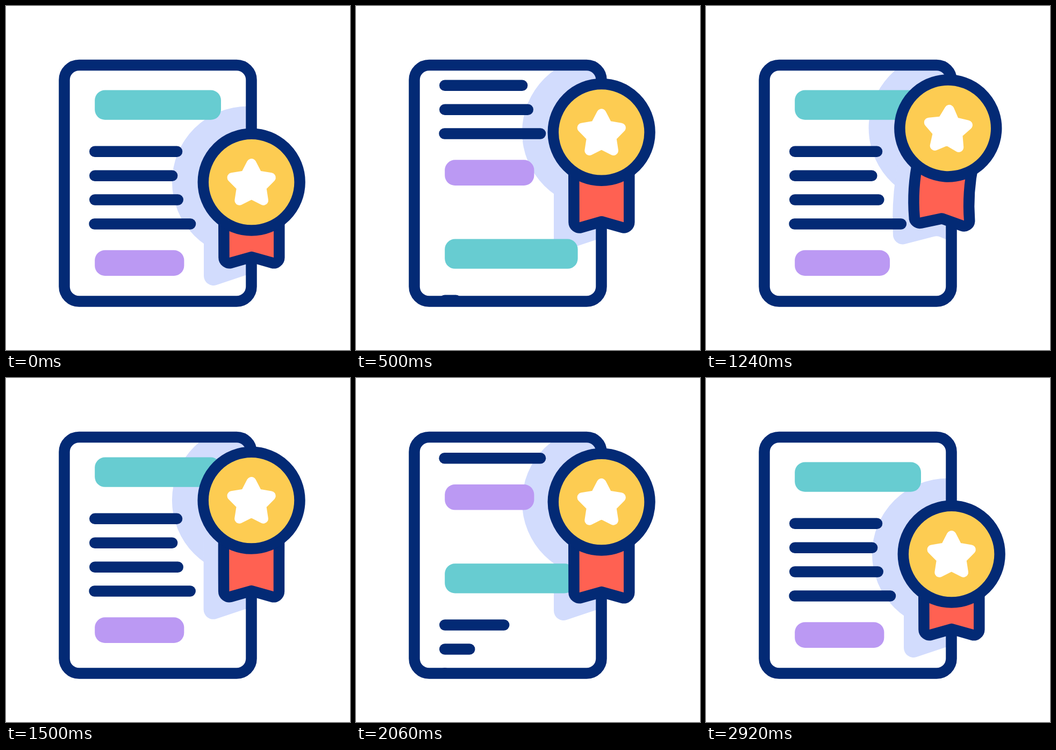
An HTML page that plays this animation: 640 by 640 pixels, repeating every 3020 ms.

```html
<!DOCTYPE html>
<html lang="en">
<head>
<meta charset="utf-8">
<title>Certificate</title>
<style>
  html, body { margin: 0; width: 100%; height: 100%; overflow: hidden; background: #fff; }
  svg { display: block; width: 100%; height: 100%; }
</style>
</head>
<body>
<svg viewBox="0 0 640 640">
  <clipPath id="page"><rect x="108.5" y="110" width="348" height="439.5" rx="27.5"/></clipPath>
  <g clip-path="url(#page)">
    <g class="swing" fill="#d2dcfd">
      <circle cx="450" cy="327.5" r="141"/>
      <path id="shadowTail"/>
    </g>
    <g class="copy"></g>
    <g class="copy"></g>
  </g>
  <g fill="none" stroke="#032a75" stroke-width="20.5">
    <rect x="108.5" y="110" width="348" height="439.5" rx="27.5"/>
    <g class="swing">
      <path id="tail" fill="#ff6152" stroke-linejoin="round"/>
      <circle cx="456.7" cy="327.7" r="89.9" fill="#fdcc52"/>
      <path id="star" fill="#fff" stroke="#fff" stroke-width="18" stroke-linejoin="round"/>
    </g>
  </g>
</svg>
<script>
const LOOP = 3020, SECOND = 1400, PERIOD = 445;
const NAVY = '#032a75';
const $ = id => document.getElementById(id);
const all = selector => [...document.querySelectorAll(selector)];

const line = (x, y, w, start) =>
  ({ x, y: y - 10.25, w, h: 20.5, r: 10.25, color: NAVY, start, min: 20.5, extra: 24 });
const block = (y, w, h, color, start) =>
  ({ x: 165.2, y, w, h, r: 19, color, start, min: 0, extra: w * 0.085 });

const items = [
  block(156.5, 234.8, 55.3, '#67ccd1', 112),
  line(155, 270.8, 173.3, 409),
  line(155, 315.7, 164.4, 512),
  line(155, 360.6, 175, 653),
  line(154.3, 405.5, 199, 756),
  block(454.3, 166.2, 47.6, '#bb99f3', 745)
];

const copies = all('.copy').map(group => ({
  group,
  bars: items.map(item => {
    const bar = document.createElementNS('http://www.w3.org/2000/svg', 'rect');
    const attrs = { x: item.x, y: item.y, height: item.h, rx: item.r, ry: item.r, fill: item.color };
    for (const name in attrs) bar.setAttribute(name, attrs[name]);
    return group.appendChild(bar);
  })
}));

// Eased value between [time, value] keys
function tween(t, keys) {
  if (t <= keys[0][0]) return keys[0][1];
  for (let i = 1; i < keys.length; i++) {
    const [t0, a] = keys[i - 1], [t1, b] = keys[i];
    if (t < t1) {
      const x = (t - t0) / (t1 - t0);
      return a + (b - a) * x * x * (3 - 2 * x);
    }
  }
  return keys[keys.length - 1][1];
}

function barWidth({ w, min, extra, start }, t) {
  if (t < start) return 0;
  return tween(t - start, [[0, min], [433, w + extra], [643, w - extra / 8], [773, w]]);
}

function drawCopy({ group, bars }, y, t) {
  group.setAttribute('transform', `translate(0 ${y})`);
  bars.forEach((bar, i) => bar.setAttribute('width', barWidth(items[i], t)));
}

const lift = [[0, 0], [600, 1], [2000, 1], [2600, 0]];
const sway = [[900, 0], [1000, 5], [1200, -5], [1400, 5], [1600, -5], [1800, 5], [1900, 0]];

function drawBadge(t) {
  const up = tween(t, lift), angle = tween(t, sway);
  const stretch = 29 * up, bow = 2 * angle;
  for (const g of all('.swing'))
    g.setAttribute('transform', `translate(0 ${-100 * up}) rotate(${-angle} 456.7 234)`);

  const y = 468 + stretch, mid = (390 + y) / 2;
  $('tail').setAttribute('d', `M405.2 390 Q${405.2 + bow} ${mid} 405.5 ${y}
    A10.25 10.25 0 0 0 418.5 ${y + 9.85} L456.9 ${y - 1} L495.3 ${y + 9.85}
    A10.25 10.25 0 0 0 508.3 ${y} Q${508.3 + bow} ${mid} 508.3 390Z`);

  const s = 502 + stretch, half = (400 + s) / 2;
  $('shadowTail').setAttribute('d', `M368 400 Q${368 + bow} ${half} 368 ${s}
    A18 18 0 0 0 391.7 ${s + 17} L444 ${s - 0.5} Q450 ${s - 2.5} 456 ${s - 0.5} L508.3 ${s + 17}
    A18 18 0 0 0 532 ${s} Q${532 + bow} ${half} 532 400Z`);
}

const starPoints = Array.from({ length: 10 }, (_, i) => {
  const r = i % 2 ? 19.5 : 38, a = i * Math.PI / 5;
  return [456.7 + r * Math.sin(a), 331 - r * Math.cos(a)];
});
$('star').setAttribute('d', 'M' + starPoints.join('L') + 'Z');

function frame() {
  const t = performance.now() % LOOP;
  const second = t >= SECOND, local = second ? t - SECOND : t;
  const scroll = tween(local, [[0, 0], [1200, PERIOD]]);
  drawCopy(copies[0], -scroll, second ? t : LOOP);
  drawCopy(copies[1], PERIOD - scroll, local);
  drawBadge(t);
  requestAnimationFrame(frame);
}
frame();
</script>
</body>
</html>
```
